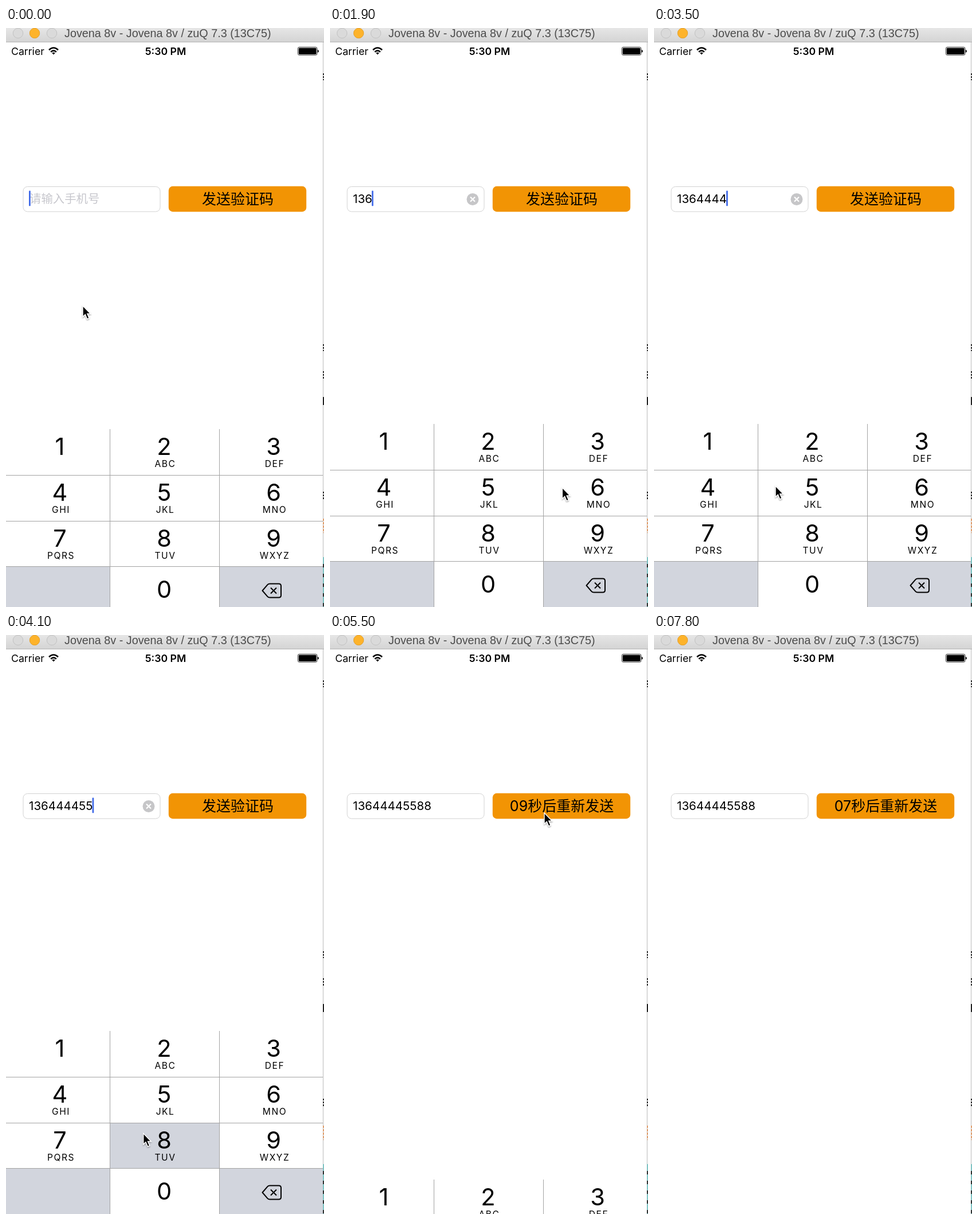
An HTML page for the animation above (8000 ms loop, 555 by 1009 pixels).

```html
<!DOCTYPE html>
<html lang="zh">
<head>
<meta charset="utf-8">
<title>Verification code form</title>
<style>
  html, body { margin: 0; width: 100%; height: 100%; overflow: hidden; background: #fff; }
  svg { display: block; width: 555px; height: 1009px; }
  text { font-family: Inter, "Noto Sans CJK SC", "Noto Sans CJK", sans-serif; white-space: pre; }
  .mid { text-anchor: middle; }
  .window { font: 19.8px "Liberation Sans", Arial, sans-serif; fill: #4c4c4c; }
  .status { font-size: 17.7px; }
  .clock { font-weight: 600; }
  .field { font-size: 20.6px; }
  .hint { font-size: 20.4px; fill: #c7c7cd; }
  .title { font-size: 25px; }
  .digit { font-size: 41.5px; }
  .letters { font-size: 15.6px; letter-spacing: 1.5px; }
  .rule { stroke: #a3a3a3; stroke-width: 1; }
</style>
</head>
<body>
<svg viewBox="0 0 555 1009" xmlns="http://www.w3.org/2000/svg">
  <defs>
    <linearGradient id="bar" x2="0" y2="1">
      <stop stop-color="#e6e6e6"/><stop offset="1" stop-color="#d4d4d4"/>
    </linearGradient>
    <filter id="shade" x="-50%" y="-50%" width="200%" height="200%">
      <feDropShadow dx="0" dy="1.5" stdDeviation="1.3" flood-opacity=".4"/>
    </filter>
  </defs>

  <rect width="555" height="1009" fill="#fff"/>

  <!-- phone status bar -->
  <text class="status" x="9" y="46.6">Carrier</text>
  <g fill="none" stroke="#000" stroke-width="2.6">
    <path d="M75 38.2Q83 30.8 91 38.2M78.2 41.7Q83 37.2 87.8 41.7"/>
    <path d="M80.3 43.6Q83 41.4 85.7 43.6L83 46.6Z" fill="#000" stroke="none"/>
  </g>
  <text class="status clock mid" x="278.5" y="46.6">5:30 PM</text>
  <rect x="509.4" y="33.3" width="33.6" height="14" rx="2.6" fill="#fff" stroke="#000" stroke-width=".8"/>
  <rect x="510.8" y="34.7" width="30.8" height="11.2" rx="1.4"/>
  <path d="M543.8 37.7q2.1 .6 2.1 2.6t-2.1 2.6z"/>

  <!-- phone number field -->
  <rect x="30" y="276.5" width="239" height="43.5" rx="7.5" fill="#fff" stroke="#d2d2d2"/>
  <text id="hint" class="hint" x="41" y="305">请输入手机号</text>
  <text id="number" class="field" x="40" y="305.3"></text>
  <rect id="caret" y="283.6" width="2.8" height="26.6" rx="1" fill="#426be8"/>
  <g id="clear">
    <circle cx="249" cy="298.5" r="10.5" fill="#c6c6c8"/>
    <path d="M245 294.5l8 8m0-8l-8 8" stroke="#fff" stroke-width="2.2"/>
  </g>

  <!-- send button -->
  <rect x="283.8" y="275.8" width="240.4" height="44.4" rx="7.2" fill="#f29404"/>
  <text id="oldTitle" class="title mid" x="404.5" y="307.4"></text>
  <text id="newTitle" class="title mid" x="404.5" y="307.4"></text>

  <g id="pad"></g>

  <!-- window frame -->
  <rect width="555" height="24" fill="url(#bar)"/>
  <path d="M0 24.5H555" stroke="#b4b4b4"/>
  <g fill="#dadada" stroke="#c2c2c2">
    <circle cx="21" cy="9" r="8.7"/>
    <circle cx="50" cy="9" r="8.7" fill="#fdb32b" stroke="#e3a02c"/>
    <circle cx="80" cy="9" r="8.7"/>
  </g>
  <text class="window" x="102" y="16">Jovena 8v - Jovena 8v / zuQ 7.3 (13C75)</text>
  <path d="M553.5 25V1009" stroke="#bdbdbd"/>
  <g fill="none" stroke-width="2">
    <path d="M554 79v12M554 551v12M554 598v13M554 808v15" stroke="#333" stroke-dasharray="3 2"/>
    <path d="M554 643v14" stroke="#222"/>
    <path d="M554 855v25" stroke="#e0a070" stroke-dasharray="4 2"/>
    <path d="M554 922v87" stroke="#7fc4c4"/>
    <path d="M554 934v75" stroke="#333" stroke-dasharray="6 11"/>
  </g>

  <path id="pointer" d="M0 0V19.2L4.3 15.2L7.6 23L11 21.6L7.8 14H13.6Z"
        stroke="#fff" stroke-width="1.4" filter="url(#shade)"/>
</svg>

<script>
const LOOP = 8000, STEP = 100;
const REST = 690, DROP = 320, OMEGA = 18.26 / 1000;
const KEY_GREY = '#d2d5dd';
const $ = id => document.getElementById(id);

// [time, digit]
const presses = [
  [800, 1], [1300, 3], [1700, 6], [2500, 4], [2700, 4], [2900, 4],
  [3200, 4], [3700, 5], [3900, 5], [4200, 8], [4400, 8]
];

// [time, x, y] of the pointer tip
const path = [
  [0, 134, 484], [600, 112, 722], [800, 112, 726], [1100, 437, 727],
  [1350, 440, 730], [1650, 440, 800], [1800, 438, 802], [2300, 124, 792],
  [3250, 124, 792], [3500, 212, 798], [3700, 238, 805], [3950, 238, 806],
  [4150, 240, 880], [4400, 242, 880], [4800, 360.6, 338.5], [5100, 374, 310],
  [5500, 374, 310], [5900, 580, 420]
];

// [time, title]
const titles = [
  [-1000, '发送验证码'], [5100, '09秒后重新发送'],
  [6100, '08秒后重新发送'], [7100, '07秒后重新发送']
];

const letters = ['', 'ABC', 'DEF', 'GHI', 'JKL', 'MNO', 'PQRS', 'TUV', 'WXYZ'];
const columns = [0, 181.5, 372.5, 553];
const rows = [0, 80, 160, 239];
const centers = [94, 276, 467];
const keys = {};

function add(tag, attrs, text = '') {
  const el = document.createElementNS('http://www.w3.org/2000/svg', tag);
  for (const name in attrs) el.setAttribute(name, attrs[name]);
  el.textContent = text;
  $('pad').append(el);
  return el;
}

function buildPad() {
  for (let i = 0; i < 12; i++) {
    const col = i % 3, y = rows[Math.floor(i / 3)];
    const digit = i < 9 ? i + 1 : i === 10 ? 0 : null;
    const cell = add('rect', {
      x: columns[col], y, width: columns[col + 1] - columns[col], height: 81,
      fill: digit === null ? KEY_GREY : '#fff'
    });
    if (digit === null) continue;
    keys[digit] = cell;
    add('text', { class: 'digit mid', x: centers[col], y: y + (digit ? 44.7 : 55.2) }, digit);
    if (digit > 1) add('text', { class: 'letters mid', x: centers[col] + 2, y: y + 66.2 }, letters[i]);
  }
  for (const y of rows.slice(1)) add('path', { class: 'rule', d: `M0 ${y + .5}H553` });
  for (const x of columns.slice(1, 3)) add('path', { class: 'rule', d: `M${x} 0V320` });
  add('path', {
    d: 'M447.5 281.5L456.5 271.2Q458 269.5 460.5 269.5H476Q480 269.5 480 273.5V289.5Q480 293.5 476 293.5H460.5Q458 293.5 456.5 291.8ZM462 276.5l10 10m0-10l-10 10',
    fill: 'none', stroke: '#000', 'stroke-width': 2, 'stroke-linejoin': 'round'
  });
}

// Critically damped spring: the share of the way still left
const left = ms => (1 + OMEGA * ms) * Math.exp(-OMEGA * ms);
const padTop = t => REST + DROP * (t < 5332 ? left(t + 298) : 1 - left(t - 5332));

function pointerAt(t) {
  const n = path.findIndex(p => p[0] > t);
  if (n < 0) return path[path.length - 1].slice(1);
  const [a, b] = [path[n - 1], path[n]];
  const u = (t - a[0]) / (b[0] - a[0]), e = u * u * (3 - 2 * u);
  return [a[1] + (b[1] - a[1]) * e, a[2] + (b[2] - a[2]) * e];
}

function show(id, on) { $(id).style.visibility = on ? 'visible' : 'hidden'; }

function drawField(t) {
  const typed = presses.filter(p => p[0] <= t).map(p => p[1]).join('');
  const editing = t < 5400;
  $('number').textContent = typed;
  const width = typed ? $('number').getComputedTextLength() - 1 : 0;
  $('caret').setAttribute('x', 40 + width);
  show('hint', !typed);
  show('caret', editing);
  show('clear', typed && editing);
}

function drawTitle(t) {
  const n = titles.filter(p => p[0] <= t).length - 1;
  const fade = Math.min(1, (t - titles[n][0] + STEP) / 400);
  $('newTitle').textContent = titles[n][1];
  $('newTitle').style.opacity = fade;
  $('oldTitle').textContent = n ? titles[n - 1][1] : '';
  $('oldTitle').style.opacity = 1 - fade;
}

function draw(t) {
  drawField(t);
  drawTitle(t);
  $('pad').setAttribute('transform', `translate(0 ${Math.round(padTop(t))})`);
  for (const digit in keys) {
    const down = presses.some(p => p[1] == digit && t >= p[0] - STEP && t <= p[0]);
    keys[digit].setAttribute('fill', down ? KEY_GREY : '#fff');
  }
  const [x, y] = pointerAt(t);
  $('pointer').setAttribute('transform', `translate(${x} ${y})`);
}

buildPad();
const start = performance.now();
function frame() {
  const t = (performance.now() - start) % LOOP;
  draw(Math.floor(t / STEP) * STEP);
  requestAnimationFrame(frame);
}
frame();
</script>
</body>
</html>
```
